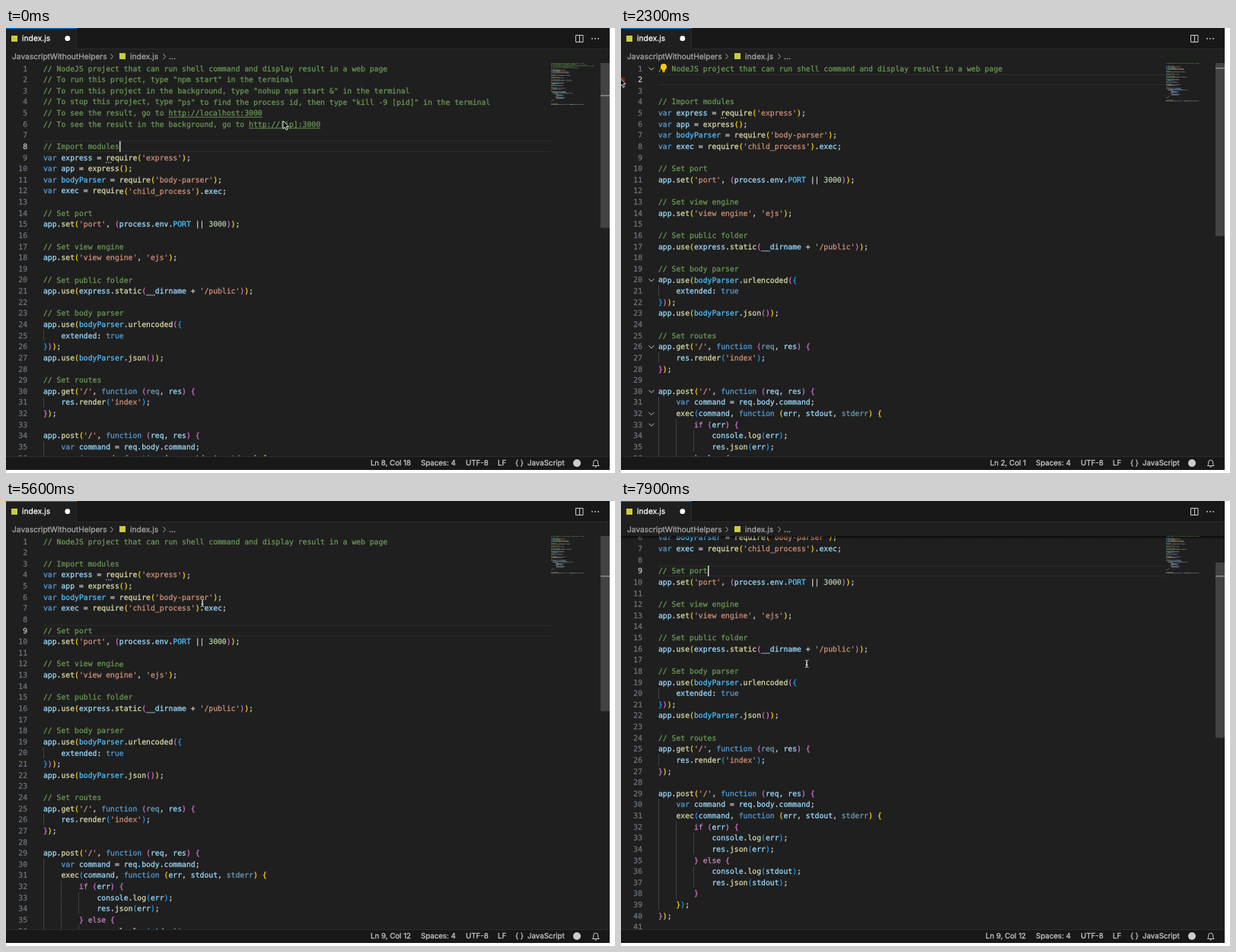
Recreate the animation shown at these times as an HTML page with a canvas. Size 800 px wide and 585 px high, loop 8000 ms.

```html
<!DOCTYPE html>
<html lang="en">
<head>
<meta charset="utf-8">
<title>Code editor</title>
<style>
html, body { margin: 0; width: 100%; height: 100%; overflow: hidden; background: #fff; }
canvas { display: block; }
</style>
</head>
<body>
<canvas id="stage" width="800" height="585"></canvas>
<script>
const ctx = document.getElementById('stage').getContext('2d');
const LOOP = 8000, W = 793, H = 581;
const TOP = 46, VIEW = 517, LEFT = 49, ROW = 14.626, CHAR = 5.872, BASE = 10.6;
const MONO = '9.753px "DejaVu Sans Mono", monospace';
const ui = size => `${size}px Inter, sans-serif`;
const COLOR = {
  comment: '#6a9955', string: '#ce9178', keyword: '#569cd6', flow: '#c586c0', number: '#b5cea8',
  call: '#dcdcaa', constant: '#4fc1ff', unused: '#709cb3', name: '#9cdcfe', other: '#d4d4d4'
};
const BRACKETS = ['#ffd700', '#da70d6', '#179fff'];

const title = '// NodeJS project that can run shell command and display result in a web page';
const notes = [
  '// To run this project, type "npm start" in the terminal',
  '// To run this project in the background, type "nohup npm start &" in the terminal',
  '// To stop this project, type "ps" to find the process id, then type "kill -9 [pid]" in the terminal',
  '// To see the result, go to http://localhost:3000',
  '// To see the result in the background, go to http://[ip]:3000'
];
const body = `
// Import modules
var express = require('express');
var app = express();
var bodyParser = require('body-parser');
var exec = require('child_process').exec;

// Set port
app.set('port', (process.env.PORT || 3000));

// Set view engine
app.set('view engine', 'ejs');

// Set public folder
app.use(express.static(__dirname + '/public'));

// Set body parser
app.use(bodyParser.urlencoded({
    extended: true
}));
app.use(bodyParser.json());

// Set routes
app.get('/', function (req, res) {
    res.render('index');
});

app.post('/', function (req, res) {
    var command = req.body.command;
    exec(command, function (err, stdout, stderr) {
        if (err) {
            console.log(err);
            res.json(err);
        } else {
            console.log(stdout);
            res.json(stdout);
        }
    });
});


// Start server
app.listen(app.get('port'), function () { console.log('Server started'); });
`.split('\n');

const SYNTAX = new RegExp([
  '(?<comment>//.*)', "(?<string>'[^']*')", '(?<keyword>\\b(?:var|function|true)\\b)',
  '(?<flow>\\b(?:if|else)\\b)', '(?<number>\\b\\d+)', '(?<open>[({])', '(?<close>[)}])',
  '(?<unused>\\bstderr|\\breq(?=, res\\) \\{\\n    res))', '(?<constant>\\bbodyParser|\\bPORT)',
  '(?<call>\\w+(?=\\())', '(?<name>\\w+)', '(?<other>[^\\s])', '\\n'
].join('|'), 'g');

// Splits the text into coloured words with their row and column.
function parse(lines) {
  const words = [];
  let row = 0, start = 0, depth = 0;
  for (const m of lines.join('\n').matchAll(SYNTAX)) {
    if (m[0] === '\n') { row++; start = m.index + 1; continue; }
    const kind = Object.keys(m.groups).find(k => m.groups[k]);
    if (kind === 'close') depth--;
    const color = COLOR[kind] || BRACKETS[depth % 3];
    if (kind === 'open') depth++;
    for (const w of m[0].matchAll(/\S+/g))
      words.push({ row, col: m.index - start + w.index, text: w[0], color });
  }
  return { lines, words };
}
const full = parse([title, ...notes, ...body]);
const cleared = parse([title, '', ...body]);
const tidy = parse([title, ...body]);

// Pointer path: time, x, y
const PATH = [
  [0, 364, 122], [300, 420, 128], [500, 420, 128], [1000, 230, 124], [1400, 62, 100], [1500, 57, 91.5],
  [1700, 40, 69], [1900, 40, 70], [2200, 4, 66], [2500, -12, 66], [3600, -4, 90], [4000, 150, 135],
  [4200, 200, 139], [4400, 202, 161.5], [4700, 205, 171], [5000, 205, 171], [5300, 262, 140],
  [5600, 258, 134], [6200, 190, 190], [7000, 160, 232], [7200, 160, 232], [7900, 244, 214], [8000, 244, 214]
];
const SCROLL = [[0, 0], [7100, 0], [7200, 5], [7500, 44], [7700, 68], [7900, 78.3], [8000, 79]];

function along(keys, t, i = 1) {
  const n = keys.findIndex(k => k[0] > t), a = keys[n - 1], b = keys[n];
  return a[i] + (b[i] - a[i]) * (t - a[0]) / (b[0] - a[0]);
}
const between = (t, a, b) => t >= a && t < b;

function box(x, y, w, h, color) { ctx.fillStyle = color; ctx.fillRect(x, y, w, h); }

// The minute skew keeps the browser from snapping baselines to whole pixels;
// the hairline stroke gives the slightly heavier screen weight.
function text(s, x, y, color, font, align = 'left') {
  ctx.fillStyle = ctx.strokeStyle = color;
  ctx.font = font; ctx.textAlign = align; ctx.lineWidth = .25;
  ctx.setTransform(1, 1e-4, 0, 1, 0, 0);
  ctx.fillText(s, x, y);
  ctx.strokeText(s, x, y);
  ctx.setTransform(1, 0, 0, 1, 0, 0);
}
function disc(x, y, r, color) {
  ctx.fillStyle = color; ctx.beginPath(); ctx.arc(x, y, r, 0, 7); ctx.fill();
}
function stroke(path, color = '#ccc', width = 1) {
  ctx.strokeStyle = color; ctx.lineWidth = width; ctx.stroke(new Path2D(path));
}

function stateAt(t) {
  const mouse = { x: along(PATH, t), y: along(PATH, t, 2) };
  const step = [
    { from: 0, doc: full, row: 7, col: 17 },
    { from: 1800, doc: cleared, row: 1, col: 0 },
    { from: 3300, doc: tidy, row: 0, col: 77 },
    { from: 4800, doc: tidy, row: 8, col: 11 }
  ].filter(s => t >= s.from).pop();
  const s = { ...step, mouse, scroll: along(SCROLL, t), blink: (t - step.from) % 1000 < 500, sel: null };
  if (between(t, 500, 1800)) {
    s.row = Math.floor((mouse.y - TOP) / ROW);
    const len = full.lines[s.row].length;
    s.col = Math.max(0, Math.min(len, Math.round((mouse.x + 8 - LEFT) / CHAR)));
    s.blink = false;
    s.sel = [];
    for (let r = s.row; r <= 5; r++) {
      const from = r === s.row ? s.col : 0;
      s.sel.push({ row: r, from, text: full.lines[r].slice(from) });
    }
  }
  return s;
}

function drawFrame() {
  box(0, 0, 800, 585, '#fff');
  box(0, 0, W, H, '#1f1f1f');
  box(93, 0, W - 93, 28, '#181818');
  box(93, 27, W - 93, 1, '#2b2b2b');
  box(92, 0, 1, 28, '#2b2b2b');
  box(0, 0, 93, 1, '#0078d4');
  box(7, 10, 8, 8, '#cbcb41');
  text('index.js', 21, 17.4, '#fff', ui(10.3));
  disc(80.8, 13.7, 3.4, '#fff');
  stroke('M748.5 9.5h9.5v9h-9.5zM753.5 9.5v9');
  for (const x of [770, 774, 778]) disc(x, 14, .9, '#ccc');
  text('JavascriptWithoutHelpers', 8, 41, '#a9a9a9', ui(10.2));
  stroke('M137.5 34l3 3.5l-3 3.5M206.5 34l3 3.5l-3 3.5', '#a9a9a9');
  box(149, 33, 8, 8, '#cbcb41');
  text('index.js', 163, 41, '#a9a9a9', ui(10.3));
  text('...', 214, 41, '#a9a9a9', ui(10.3));
}

function drawCode(s, t) {
  const { lines, words } = s.doc;
  const y = row => TOP + row * ROW - s.scroll, x = col => LEFT + col * CHAR;
  ctx.save();
  ctx.beginPath(); ctx.rect(0, TOP, W, VIEW); ctx.clip();

  if (s.sel) {
    for (const { row, from, text: part } of s.sel) {
      const end = x(from + part.length) + (row < 5 ? 5 : 0);
      box(x(from), y(row), end - x(from), ROW + .3, '#264f78');
      [...part].forEach((c, i) => c === ' ' && disc(x(from + i + .5), y(row) + 7.4, .6, '#6d8599'));
    }
  } else {
    box(LEFT, Math.round(y(s.row)), 666, 1, '#2b2b2b');
    box(LEFT, Math.round(y(s.row + 1)) - 1, 666, 1, '#2b2b2b');
  }
  if (between(t, 4100, 4500)) box(x(19), y(6), 15 * CHAR, ROW, '#213040');

  lines.forEach((line, row) => {
    text(row + 1, 28, y(row) + BASE, row === s.row ? '#ccc' : '#6e7681', MONO, 'right');
    const indent = line.search(/\S/);
    for (let c = 0; c < indent; c += 4) box(Math.floor(x(c)), y(row), 1, ROW, '#404040');
    if (line.startsWith('var express'))
      for (const dx of [131, 134, 137]) box(dx, y(row) + 13, 1.4, 1.4, '#aaa');
    if (between(t, 2000, 3700) && (row === 0 || line.endsWith('{'))) {
      const cy = y(row) + 5.8;
      stroke(`M36.5 ${cy}l3.5 3.5l3.5 -3.5`, '#c5c5c5');
    }
  });
  const bulb = between(t, 2200, 3300);
  for (const w of words) {
    const hidden = bulb && w.row === 0 && w.col === 0;
    text(hidden ? '/' : w.text, x(w.col), y(w.row) + BASE, w.color, MONO);
    if (w.text.startsWith('http')) box(x(w.col), y(w.row) + 12.2, w.text.length * CHAR, .9, w.color);
  }
  if (bulb) {
    disc(56, 51, 4, '#ffcc00');
    box(54, 54, 4, 2.5, '#ffcc00');
    box(54.5, 57, 3, 1.2, '#ffcc00');
  }
  if (between(t, 2100, 3600)) disc(2, 68, 3.5, '#7d1f18');
  if (s.blink) box(Math.round(x(s.col)), y(s.row) + .3, 1.5, ROW - .6, '#d4d4d4');

  if (s.scroll) {
    const shade = ctx.createLinearGradient(0, TOP, 0, TOP + 4);
    shade.addColorStop(0, '#000a');
    shade.addColorStop(1, '#0000');
    box(0, TOP, W, 4, shade);
  }
  drawMap(s);
  ctx.restore();
}

function drawMap(s) {
  const { lines, words } = s.doc, pitch = 1.12, left = 716;
  if (s.sel) box(left, TOP + s.row * pitch, 62, s.sel.length * pitch, '#264f78');
  ctx.globalAlpha = .6;
  for (const w of words)
    box(left + w.col * .57, TOP + .2 + w.row * pitch, w.text.length * .57, .8, w.color);
  ctx.globalAlpha = 1;
  const total = lines.length * ROW + VIEW - ROW, scale = VIEW / total;
  box(781, TOP + s.scroll * scale, 12, VIEW * scale, '#434343');
  box(781, Math.floor(TOP + s.row * ROW * scale), 12, 1.6, '#8a8a8a');
}

function drawStatus(s) {
  box(0, 563, W, H - 563, '#181818');
  box(0, 563, W, 1, '#2b2b2b');
  const label = (str, x, align) => text(str, x, 575.4, '#ccc', ui(9.7), align);
  const count = s.sel && s.sel.reduce((n, p) => n + p.text.length + 1, -1);
  label(`Ln ${s.row + 1}, Col ${s.col + 1}${count ? ` (${count} selected)` : ''}`, 532, 'right');
  label('Spaces: 4', 545);
  label('UTF-8', 604);
  label('LF', 646);
  label('{ }', 669);
  label('JavaScript', 685);
  disc(750, 572, 5, '#ccc');
  stroke('M770.5 575.5h8.5l-1.3 -2v-2.5a3 3 0 0 0 -6 0v2.5zM773.5 577h2.5');
}

function drawMouse({ x, y }, t) {
  if (t === 1800 || between(t, 2500, 3600)) return;
  if (t >= 5000) {
    const beam = `M${x - 2.5} ${y - 5}q2.5 0 2.5 1.5v7q0 1.5 -2.5 1.5M${x + 2.5} ${y - 5}q-2.5 0 -2.5 1.5v7q0 1.5 2.5 1.5M${x - 1.5} ${y + 1.5}h3`;
    stroke(beam, '#000', 2);
    stroke(beam, '#e0e0e0', 1);
    return;
  }
  const arrow = `M${x} ${y}v10.5l2.4 -2.2l1.7 3.8l1.8 -.8l-1.7 -3.7h3.2z`;
  ctx.fillStyle = '#000';
  ctx.fill(new Path2D(arrow));
  stroke(arrow, '#eee', .9);
}

function tick(now) {
  const t = Math.floor(now % LOOP / 100) * 100;
  const s = stateAt(t);
  ctx.textRendering = 'geometricPrecision';
  drawFrame();
  drawCode(s, t);
  drawStatus(s);
  drawMouse(s.mouse, t);
  requestAnimationFrame(tick);
}
requestAnimationFrame(tick);
</script>
</body>
</html>
```
